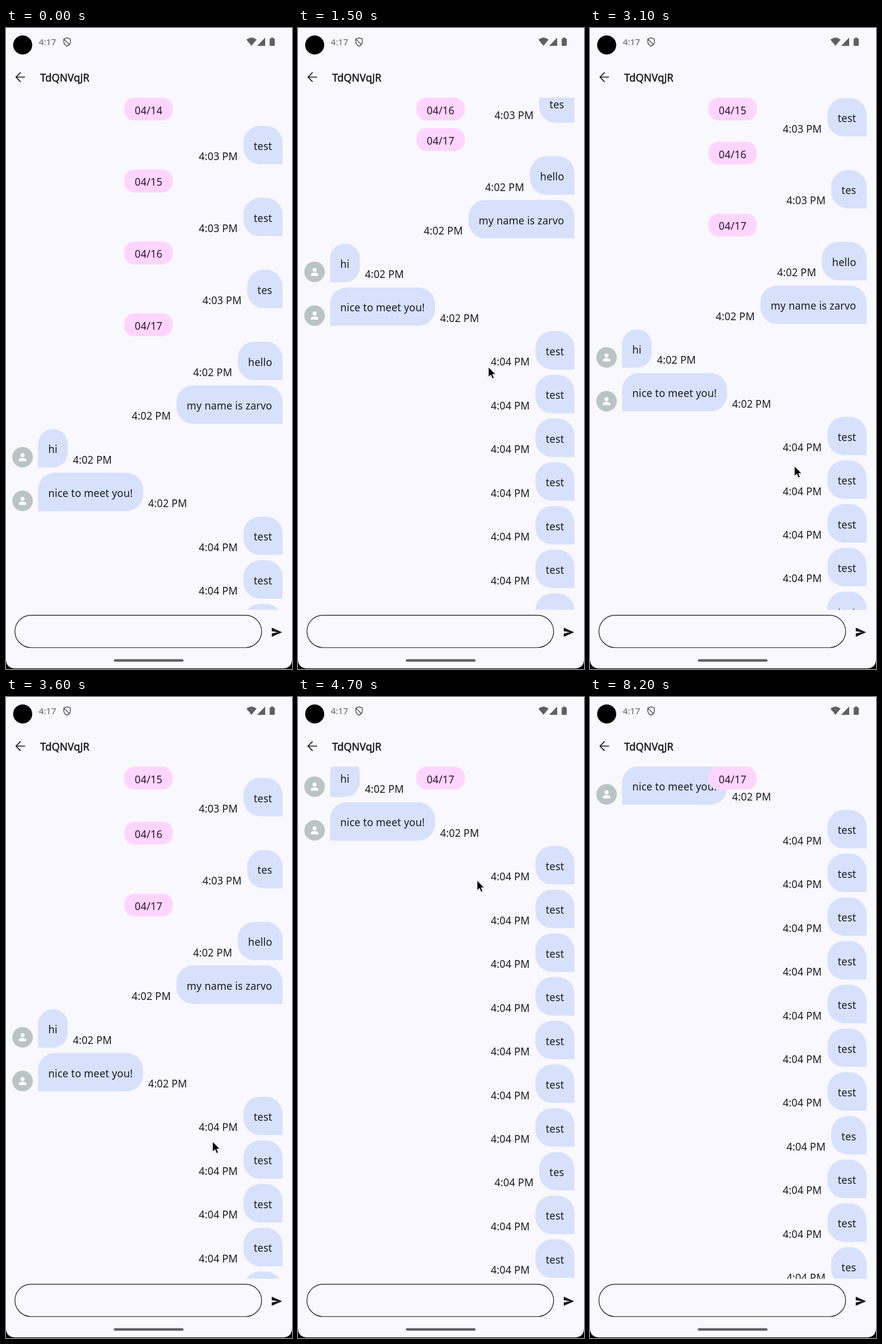
These frames come from a looping animation (480 px wide and 1077 px high, 9170 ms). An HTML page:

```html
<!DOCTYPE html>
<html lang="en">
<head>
<meta charset="utf-8">
<title>Chat scroll</title>
<style>
  html, body { margin: 0; width: 100%; height: 100%; overflow: hidden; background: #000; }
  svg { display: block; width: 100vw; height: 100vh; }
  text { font: 17.25px "Noto Sans", "Open Sans", sans-serif; letter-spacing: .12px; fill: #1a1b20; }
  .medium { stroke: #1a1b20; stroke-width: .5px; }
  .line { fill: none; stroke: #1a1b20; stroke-width: 1.7; stroke-linecap: round; stroke-linejoin: round; }
  .system { fill: #5f5f64; }
  .bubble { fill: #d7e1fc; }
  .pill { fill: #ffd5ff; }
  .pill + text { fill: #2b1232; text-anchor: middle; }
</style>
</head>
<body>
<svg viewBox="0 0 480 1077" preserveAspectRatio="none">
  <defs>
    <clipPath id="listArea"><rect y="117" width="480" height="860.5"/></clipPath>
    <clipPath id="photoArea"><circle cx="438" cy="82.3" r="17.4"/></clipPath>
    <filter id="soft" x="-50%" y="-50%" width="200%" height="200%">
      <feDropShadow dx="0" dy=".7" stdDeviation=".8" flood-opacity=".18"/>
    </filter>
    <g id="person">
      <circle r="34.5" fill="#bac4c5"/>
      <g fill="#fff">
        <circle cy="-7" r="6.7"/>
        <path d="M-12.5 10C-12.5 5 -7 2.5 0 2.5S12.5 5 12.5 10V11.5Q12.5 13.5 10.5 13.5H-10.5Q-12.5 13.5 -12.5 11.5Z"/>
      </g>
    </g>
  </defs>

  <path d="M0 0H480V1060Q480 1076 464 1076H16Q0 1076 0 1060Z" fill="#f9f8ff"/>

  <g id="chat">
    <path class="line" d="M31.3 82.5H16.7M24 75.2L16.7 82.5L24 89.8"/>
    <text class="medium" x="57.5" y="90.3">TdQNVqJR</text>
    <g clip-path="url(#listArea)">
      <g id="messages"></g>
      <g id="dates"></g>
    </g>
    <rect x="15" y="986.6" width="414" height="54.4" rx="27.2" fill="none" stroke="#1a1b20" stroke-width="1.2"/>
    <path d="M446 1007.5L463.5 1015.3L446 1023V1017.2L456 1015.3L446 1013.4Z" fill="#1a1b20"/>
  </g>

  <g id="home">
    <circle cx="36.5" cy="82.5" r="8" fill="#1a1b20"/>
    <text class="medium" x="58" y="88.3">HFuDhMRf</text>
    <g clip-path="url(#photoArea)">
      <rect x="420" y="64" width="36" height="36" fill="#78d72f"/>
      <rect x="431" y="71" width="25" height="9" fill="#5a5a36"/>
      <rect x="428" y="80" width="28" height="13" fill="#07931f"/>
      <rect x="436" y="92" width="20" height="8" fill="#126b1b"/>
    </g>
    <text class="medium" x="23.5" y="163.3" style="font-size:34.5px;stroke-width:1px">38</text>
    <text x="23.5" y="194.8" style="font-size:12.9px;letter-spacing:.13px;fill:#565e71">total message</text>
    <rect x="317.5" y="136.5" width="138.5" height="44" rx="22" fill="#eff1f9" filter="url(#soft)"/>
    <path class="line" style="stroke:#365a95;stroke-width:1.6"
      d="M352.5 150C356 153 355 156 357 160H354.5V164C354.5 165.5 353 165.5 351 165M347 160V162M346.5 168.5H350M359.5 157Q362 160 359.5 163.5M362.5 154.5Q367 160.5 361.5 167"/>
    <text x="378" y="164.7" style="font-size:12.9px;fill:#365a95;stroke:#365a95;stroke-width:.35px">Whisper</text>
    <text class="medium" x="23.5" y="249.5">Recent Chats</text>
    <use href="#person" x="58" y="317"/>
    <text x="101" y="305.7">TdQNVqJR</text>
    <text x="101" y="337.8" style="font-size:13.3px;fill:#55565d">20</text>
    <circle cx="446.5" cy="334.3" r="7.2" fill="#1a1b20"/>
    <path class="line" style="stroke:#fff;stroke-width:1.3" d="M443.3 334.5L445.7 336.8L449.8 332.5"/>
    <path d="M110.5 1035L118.5 1028L126.5 1035V1045Q126.5 1047 124.5 1047H121.5V1040H115.5V1047H112.5Q110.5 1047 110.5 1045Z" fill="#3d5f96"/>
    <rect x="115" y="1057" width="7" height="2.2" rx="1" fill="#3d5f96"/>
    <path id="gear" class="line" transform="translate(360.5 1037)"/>
    <circle cx="360.5" cy="1037" r="3" fill="#1a1b20"/>
  </g>

  <g class="system">
    <text class="system" x="55" y="29" style="font-size:14.7px;letter-spacing:0">4:17</text>
    <path class="line" style="stroke:#5f5f64;stroke-width:1.5" d="M102.5 16.5L108 18.5V23Q108 28 102.5 30.5Q97 28 97 23V18.5ZM97.5 19L106.5 28"/>
    <path d="M412 30L403.5 19.5Q412 12.5 420.5 19.5Z"/>
    <path d="M435 16V30H421.5Z"/>
    <path d="M443.5 17.5H445V16H448.5V17.5H450Q451 17.5 451 18.5V29Q451 30 450 30H443.5Q442.5 30 442.5 29V18.5Q442.5 17.5 443.5 17.5Z"/>
    <rect x="181" y="1060.5" width="117" height="4.3" rx="2.1"/>
  </g>
  <circle cx="28" cy="28.5" r="16" fill="#000"/>

  <path id="cursor" d="M0 0V17L4 13.4L6.7 19.7L9.6 18.5L7 12.4H12.3Z" stroke="#fff" stroke-width="1" filter="url(#soft)"/>
</svg>

<script>
const LOOP = 9170, STEP = 100;
const TOP = 117, PILL = 38.5, BUBBLE = 64.6, GAP = 8.9, RADIUS = 28, PAD = 17.3;
const byId = id => document.getElementById(id);

function add(parent, tag, attrs, content = "") {
  const node = document.createElementNS("http://www.w3.org/2000/svg", tag);
  for (const key in attrs) node.setAttribute(key, attrs[key]);
  node.textContent = content;
  return parent.appendChild(node);
}

// Rounded on all corners but the lower one on the sender's side.
function bubblePath(x, y, w, h, mine) {
  const r = Math.min(RADIUS, w / 2);
  const left = mine ? r : 0, right = mine ? 0 : r;
  return `M${x + r} ${y}H${x + w - r}a${r} ${r} 0 0 1 ${r} ${r}V${y + h - right}` +
    `a${right} ${right} 0 0 1 ${-right} ${right}H${x + left}` +
    `a${left} ${left} 0 0 1 ${-left} ${-left}V${y + r}a${r} ${r} 0 0 1 ${r} ${-r}Z`;
}

function addMessage(y, content, time, mine) {
  const list = byId("messages");
  const shape = add(list, "path", { class: "bubble" });
  const label = add(list, "text", { y: y + 40.6 }, content);
  const width = label.getComputedTextLength() + 2 * PAD;
  const x = mine ? 464 - width : 53.8;
  shape.setAttribute("d", bubblePath(x, y, width, BUBBLE, mine));
  label.setAttribute("x", x + PAD);
  add(list, "text", {
    x: mine ? x - 9.4 : x + width + 8.4, y: y + 58, "text-anchor": mine ? "end" : "start"
  }, time);
  if (!mine) add(list, "use", {
    href: "#person", transform: `translate(27.8 ${y + BUBBLE - 17.3}) scale(.5)`
  });
}

function addDate(y, content) {
  const node = add(byId("dates"), "g", {});
  add(node, "rect", { class: "pill", x: 198.5, width: 81.5, height: PILL, rx: 17.25 });
  add(node, "text", { x: 239.2, y: 27.5 }, content);
  return { node, y };
}

// A leading ">" marks a received message.
const days = [
  ["04/14", "4:03 PM", ["test"]],
  ["04/15", "4:03 PM", ["test"]],
  ["04/16", "4:03 PM", ["tes"]],
  ["04/17", "4:02 PM", ["hello", "my name is zarvo", ">hi", ">nice to meet you!"]],
  [null, "4:04 PM", [...Array(7).fill("test"), "tes", "test", "test", "tes", "test", "test"]]
];
const dates = [];
let nextY = TOP;
for (const [date, time, messages] of days) {
  if (date) {
    dates.push(addDate(nextY, date));
    nextY += PILL + GAP;
  }
  for (const message of messages) {
    const mine = message[0] !== ">";
    addMessage(nextY, mine ? message : message.slice(1), time, mine);
    nextY += BUBBLE + GAP - .05;
  }
}

// Six-toothed settings wheel.
const teeth = Array.from({ length: 24 }, (_, i) => {
  const angle = (i - .5) * Math.PI / 12 - Math.PI / 2;
  const r = i % 4 < 2 ? 9.5 : 7.2;
  return `${r * Math.cos(angle)} ${r * Math.sin(angle)}`;
});
byId("gear").setAttribute("d", `M${teeth.join("L")}Z`);

// Time, cursor x, cursor y, scroll offset.
const path = [
  [100, 430, 960, 0], [300, 365, 880, 0], [400, 365, 880, 0],
  [1000, 350, 765, 115], [1500, 319.5, 569.5, 311.4], [2100, 275, 95, 785],
  [2200, 275, 95, 785], [3100, 343, 736, 167.6], [4100, 350.5, 758, 131],
  [4700, 300.5, 308, 570.5], [5000, 286, 249, 631], [5200, 283, 246, 631],
  [5500, 24, 82, 631], [5700, 24, 82, 631], [6300, 192, 328, 631],
  [7200, 192, 328, 631], [7600, 225, 338, 631], [8200, 492, 262, 631]
];

function poseAt(t) {
  const i = path.findIndex(key => key[0] >= t);
  if (i === 0) return path[0];
  if (i < 0) return path[path.length - 1];
  const a = path[i - 1], b = path[i], p = (t - a[0]) / (b[0] - a[0]);
  return a.map((value, k) => value + (b[k] - value) * p);
}

function fade(t, start) {
  const p = Math.min(1, Math.max(0, (t - start) / 700));
  return p * p * (3 - 2 * p);
}

function draw(now) {
  const t = Math.min(8200, Math.floor(now % LOOP / STEP) * STEP);
  const [, x, y, scroll] = poseAt(t);

  byId("messages").setAttribute("transform", `translate(0 ${-scroll})`);
  dates.forEach((date, i) => {
    const next = dates[i + 1];
    const limit = next ? next.y - scroll - PILL : Infinity;
    const top = Math.min(Math.max(TOP, date.y - scroll), limit);
    date.node.setAttribute("transform", `translate(0 ${top})`);
  });

  const homeAlpha = fade(t, 5500) - fade(t, 6400);
  byId("home").setAttribute("opacity", homeAlpha);
  byId("chat").setAttribute("opacity", 1 - homeAlpha);

  const cursor = byId("cursor");
  cursor.setAttribute("transform", `translate(${x} ${y})`);
  cursor.setAttribute("visibility", t < 100 || t >= 8200 ? "hidden" : "visible");
}

const start = performance.now();
function tick() {
  draw(performance.now() - start);
  requestAnimationFrame(tick);
}
tick();
</script>
</body>
</html>
```
